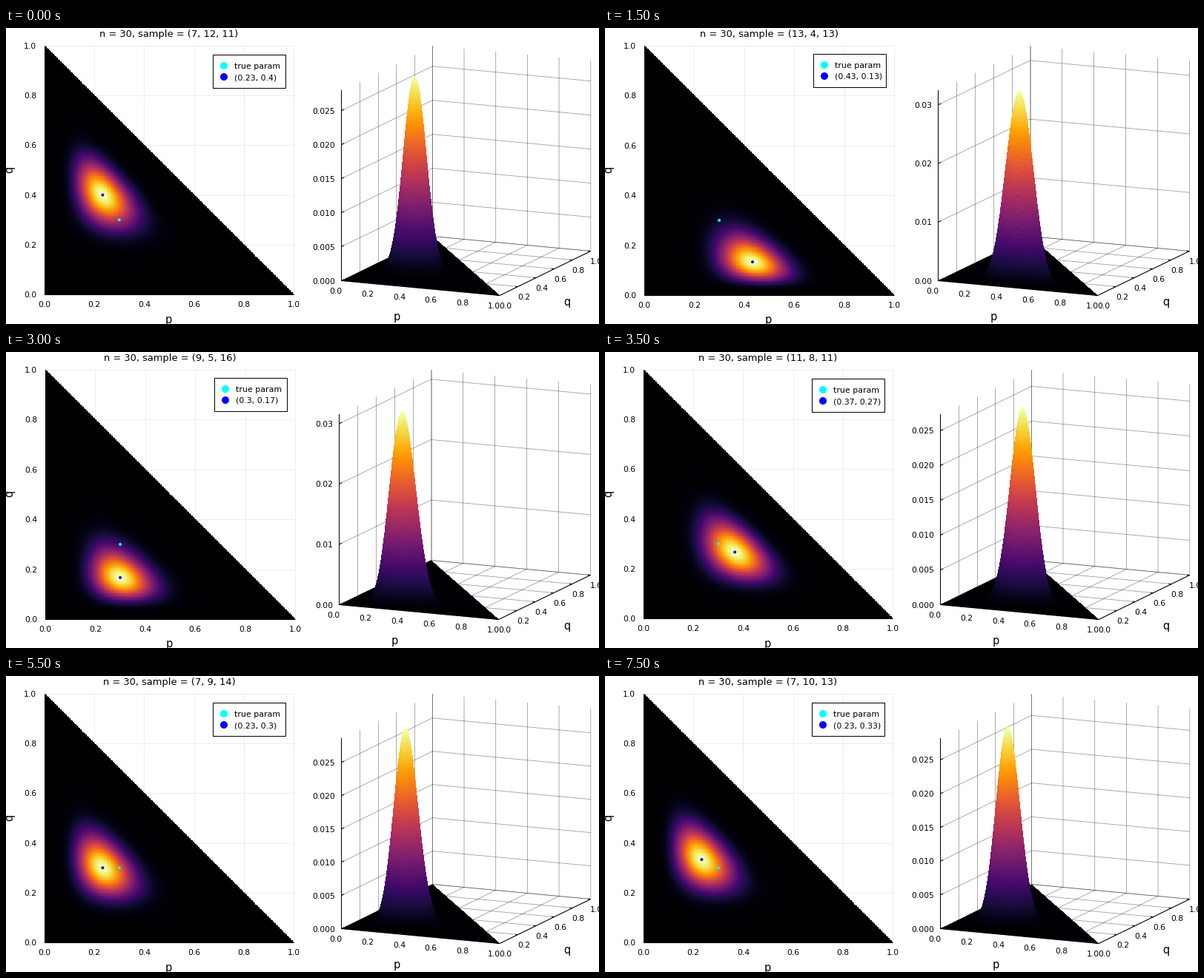
A matplotlib script for the animation above (8000 ms loop, 800 by 400 pixels).

```python
import math

import matplotlib.pyplot as plt
import numpy as np
from matplotlib.animation import FuncAnimation
from matplotlib.patches import Circle, Rectangle

plt.rcParams["font.family"] = "DejaVu Sans"

TOTAL = 30
TRUE = (0.3, 0.3)
# Counts (a, b) of each drawn sample; the third count is the remainder.
SAMPLES = [(7, 12), (6, 7), (9, 9), (13, 4), (9, 7), (8, 8), (9, 5), (11, 8),
           (10, 8), (8, 10), (9, 8), (7, 9), (8, 6), (10, 7), (7, 8), (7, 10)]

PX = 0.72  # points per pixel at 100 dpi
TICK, LEGEND, TITLE, GUIDE = 10.7, 11, 13, 14.67
FIFTHS = np.arange(6) / 5
MAP_N, SURFACE_N = 200, 400

CMAP = plt.get_cmap("inferno").copy()
CMAP.set_bad(alpha=0)

fig = plt.figure(figsize=(8, 4), dpi=100, facecolor="white")
ax = fig.add_axes([0, 0, 1, 1])


def simplex(n):
    p, q = np.meshgrid(np.linspace(0, 1, n), np.linspace(0, 1, n))
    return p, q, p + q <= 1


MAP_GRID, SURFACE_GRID = simplex(MAP_N), simplex(SURFACE_N)


def likelihood(a, b, grid):
    p, q, inside = grid
    c = TOTAL - a - b
    coef = math.factorial(TOTAL) // (
        math.factorial(a) * math.factorial(b) * math.factorial(c))
    return np.where(inside, coef * p**a * q**b * np.clip(1 - p - q, 0, 1)**c, 0)


def text(x, y, s, size=TICK, ha="center", va="baseline", **kw):
    ax.text(x, y, s, fontsize=size * PX, ha=ha, va=va, zorder=6, **kw)


def line(points, alpha=1, width=1, z=5):
    xs, ys = zip(*points)
    ax.plot(xs, ys, color="black", alpha=alpha, lw=width * PX, zorder=z,
            solid_capstyle="butt")


def dot(x, y, r, color, z):
    ax.add_patch(Circle((x, y), r, fc=color, ec="none", zorder=z))


def draw_heatmap(z, a, b, wide):
    left, right, top, bottom = (53, 390, 24, 361) if wide else (52, 388, 24, 360)
    size = right - left

    def at(p, q):
        return left + size * p, bottom - size * q

    for v in FIFTHS:
        line([at(v, 0), at(v, 1)], alpha=0.07, z=1)
        line([at(0, v), at(1, v)], alpha=0.07, z=1)
        text(at(v, 0)[0], bottom + 17, f"{v:.1f}")
        text(left - 11, at(0, v)[1] + 4, f"{v:.1f}", ha="right")

    h = size / (MAP_N - 1) / 2
    shade = np.ma.masked_where(~MAP_GRID[2], z / z.max())
    im = ax.imshow(shade, cmap=CMAP, vmin=0, vmax=1, origin="lower",
                   interpolation="nearest", aspect="auto", zorder=2,
                   extent=(left - h, right + h, bottom + h, top - h))
    im.set_clip_path(Rectangle((left, top), size, size, transform=ax.transData))
    line([(left, top), (left, bottom), (right, bottom)])

    est = a / TOTAL, b / TOTAL
    dot(*at(*TRUE), 2, "cyan", 5)
    dot(*at(*est), 2, "blue", 5)

    mid = left + size / 2
    text(mid, 12, f"n = {TOTAL}, sample = ({a}, {b}, {TOTAL - a - b})", TITLE)
    text(mid - 1, 399, "p", GUIDE)
    text(12, 191, "q", GUIDE, "right", "center", rotation=90)

    lx, ly = right - 109, 35 if wide else 36
    ax.add_patch(Rectangle((lx, ly), 98, 45, fc="white", ec="black",
                           lw=PX, zorder=5))
    labels = "true param", f"({round(est[0], 2)}, {round(est[1], 2)})"
    for k, (label, color) in enumerate(zip(labels, ("cyan", "blue"))):
        y = ly + 15 + 15 * k
        dot(lx + 15, y, 5, color, 6)
        text(lx + 29, y + 4, label, LEGEND, "left")


def draw_surface(z, wide):
    p, q, inside = SURFACE_GRID
    peak = z.max()
    x0, wp, wq = (449.5, 215, 124) if wide else (452.5, 213.5, 122.8)

    def at(p, q, h=0):
        return x0 + wp * p + wq * q, 341.5 + 20 * p - 60 * q - 257.5 * h

    def gridline(*points):
        line([at(*pt) for pt in points], alpha=0.4, width=0.8, z=1)

    for v in FIFTHS:
        gridline((v, 0), (v, 1), (v, 1, 1))
        gridline((1, v), (0, v))
        if v > 0:
            gridline((0, v), (0, v, 1))
        x, y = at(v, 0)
        text(x - 7.5, y + 17.5, f"{v:.1f}")
        x, y = at(1, v)
        text(x + 8, y + 17.5, f"{v:.1f}")
        line([(x, y), at(0.982, v)])

    step, digits = (0.01, 2) if wide else (0.005, 3)
    for k in range(int(peak / step) + 1):
        h = k * step / peak
        gridline((0, 0, h), (0, 1, h), (1, 1, h))
        line([at(0, 0, h), at(0, 0.03, h)])
        text(x0 - 8.5, at(0, 0, h)[1] + 4, f"{k * step:.{digits}f}", ha="right")

    # Rows run from far to near so closer cells cover those behind.
    height = z / peak
    x, y = at(p, q, height)
    tone = (height[:-1, :-1] + height[1:, 1:]
            + height[1:, :-1] + height[:-1, 1:]) / 4
    tone = np.ma.masked_where(~(inside[1:, :-1] & inside[:-1, 1:]), tone)
    ax.pcolormesh(x[::-1], y[::-1], tone[::-1], cmap=CMAP, vmin=0, vmax=1,
                  shading="flat", antialiased=False, zorder=3)

    line([at(0, 0, 1), at(0, 0), at(1, 0), at(1, 1)])
    text(x0 + 74.5, 395, "p", GUIDE)
    text(757, 374.5, "q", GUIDE)


def update(i):
    ax.cla()
    ax.axis("off")
    a, b = SAMPLES[i]
    z = likelihood(a, b, MAP_GRID)
    wide = z.max() >= 0.03
    draw_heatmap(z, a, b, wide)
    draw_surface(likelihood(a, b, SURFACE_GRID), wide)
    ax.set_xlim(0, 800)
    ax.set_ylim(400, 0)
    return []


anim = FuncAnimation(fig, update, frames=len(SAMPLES), interval=500,
                     init_func=lambda: [], repeat=True, repeat_delay=0)
plt.show()
```
